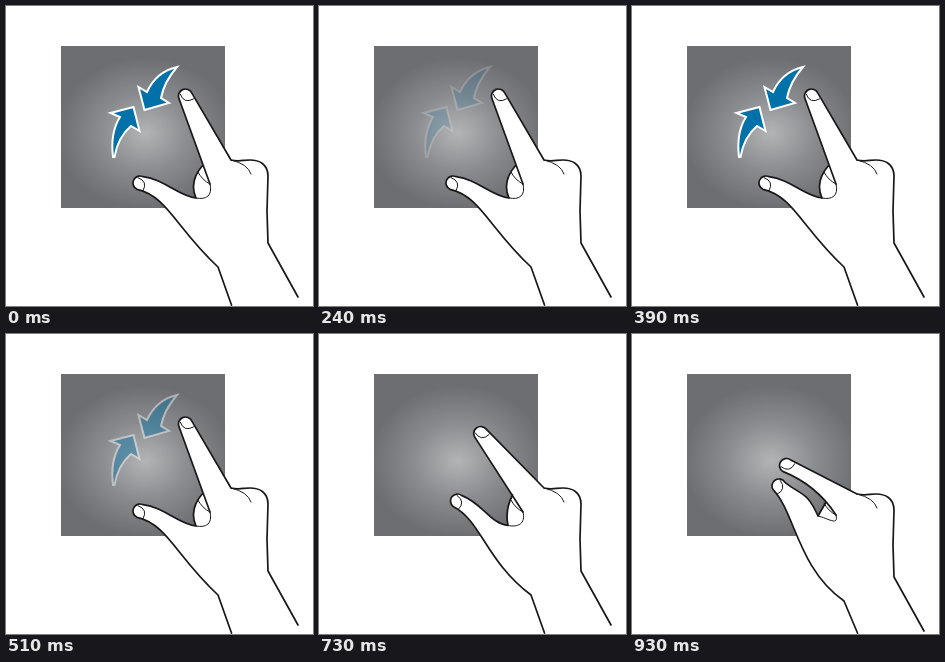
Recreate the animation shown at these times as an HTML page. Size 307 px wide and 300 px high, loop 1.83 s.

```html
<!DOCTYPE html>
<html lang="en">
<head>
<meta charset="utf-8">
<title>Pinch gesture</title>
<style>
html, body { margin: 0; width: 100%; height: 100%; overflow: hidden; background: #fff; }
svg { display: block; width: 100%; height: 100%; }
#skin { fill: #fff; }
#thick, #thin { fill: none; stroke: #1a1718; stroke-width: 1.7; stroke-linecap: round; stroke-linejoin: round; }
#thin { stroke-width: 1; }
#arrows { fill: #0071a9; stroke: #fff; stroke-width: 2; }
</style>
</head>
<body>
<svg viewBox="0 0 307 300">
  <defs>
    <radialGradient id="glow" gradientUnits="userSpaceOnUse" cx="0" cy="0" r="1"
      gradientTransform="translate(139 127) scale(88 76)">
      <stop offset="0" stop-color="#b3b4b6"/>
      <stop offset=".5" stop-color="#8b8c8f"/>
      <stop offset="1" stop-color="#6d6e71"/>
    </radialGradient>
  </defs>
  <rect x="55" y="40" width="164" height="162" fill="url(#glow)"/>
  <g id="arrows">
    <path d="M107 151Q104 127 114 111L104.500 107L127.500 101L133.500 125L125 120Q112 131 108.500 151Z"/>
    <path d="M171 61Q158 76 155 92L163 97L138.500 104L132.500 81L141 86Q150 66 171 61Z"/>
  </g>
  <path id="skin"/>
  <path id="thick"/>
  <path id="thin"/>
</svg>
<script>
const LOOP = 1830, TICK = 30, R = 7;
const byId = id => document.getElementById(id);

// Key points of the hand; bend, bulge and lift are distances
const open = { index: [179.5, 90], thumb: [134, 177], web: [190, 192], crook: [172, 190],
  heel: [170, 222], fold: [197, 159], bend: [0], bulge: [11], lift: [0] };
const closing = { ...open, index: [144, 109], thumb: [143, 157], web: [188, 191],
  heel: [166, 235], fold: [190, 163], bulge: [0] };
const pinched = { ...closing, index: [154.5, 131.5], thumb: [147, 152], web: [186, 182],
  crook: [175, 157], fold: [194, 168], bend: [11], lift: [6] };

const mix = (a, b, k) => a.map((v, i) => v + (b[i] - v) * k);
const blend = (a, b, k) =>
  Object.fromEntries(Object.keys(a).map(key => [key, mix(a[key], b[key], k)]));

// Places a point relative to a fingertip: along the finger, and towards its inner side
function finger(tip, root, side) {
  const dx = tip[0] - root[0], dy = tip[1] - root[1], len = Math.hypot(dx, dy);
  const ux = dx / len, uy = dy / len;
  return (along, inner) => [
    tip[0] + ux * along - uy * inner * side,
    tip[1] + uy * along + ux * inner * side
  ];
}

const nail = at => `M${at(4, 4)}Q${at(-7, 5)} ${at(-6, -6)}`;
const round = p => `A${R} ${R} 0 0 1 ${p}`;

function drawHand(p) {
  const lift = p.lift[0], { web, fold } = p;
  const arm = [225.5, 299], wrist = [212, 261 + lift];
  const crotch = [204, 178 + lift / 2], knuckle = [225, 154 + lift];
  const thumb = finger(p.thumb, [174, 196], 1);
  const index = finger(p.index, mix(crotch, knuckle, 0.5), -1);

  const mid = mix(crotch, index(0, R), 0.5);
  const bend = [mid[0] + p.bend[0] * 0.65, mid[1] - p.bend[0] * 0.75];
  const half = mix(web, fold, 0.5);
  const bulge = [half[0] - p.bulge[0], half[1]];

  const outline = [
    [arm, `L${wrist}C${p.heel} ${thumb(-30, 0)} ${thumb(0, -R)}${round(thumb(0, R))}` +
      `C${thumb(-20, 2 * R)} ${p.crook} ${web}`],
    [web, `Q${bulge} ${fold}`],
    [crotch, `Q${bend} ${index(0, R)}${round(index(0, -R))}L${knuckle}`],
    [knuckle, "c8 2 12 0 19 0c9 0 18 4 18 16l-1 35l1 32l30 54"]
  ];
  const join = cmd => outline.map(([from, d], i) => (i ? cmd : "M") + from + d).join("");
  byId("skin").setAttribute("d", join("L") + "Z");
  byId("thick").setAttribute("d", join("M"));
  byId("thin").setAttribute("d", nail(index) + nail(thumb) +
    `M${crotch}q-8 -4 -12 -12M${knuckle}q17 4 20 14` +
    `M${crotch}C${crotch[0] + 3} ${crotch[1] + 12} ${web[0] + 10} ${web[1] + 2} ${web}`);
}

// Fades out over 7 ticks and back in over 6
function arrowAlpha(t) {
  if (t >= 630) return 0;
  const k = Math.floor(t / TICK) % 13;
  return k < 7 ? 1 - k / 7 : (k - 7) / 6;
}

const halfway = blend(open, closing, 0.5);
const poseAt = t => t < 730 ? open : t < 830 ? halfway : t < 930 ? closing : pinched;

function frame() {
  const t = performance.now() % LOOP;
  byId("arrows").setAttribute("opacity", arrowAlpha(t));
  drawHand(poseAt(t));
  requestAnimationFrame(frame);
}
frame();
</script>
</body>
</html>
```
